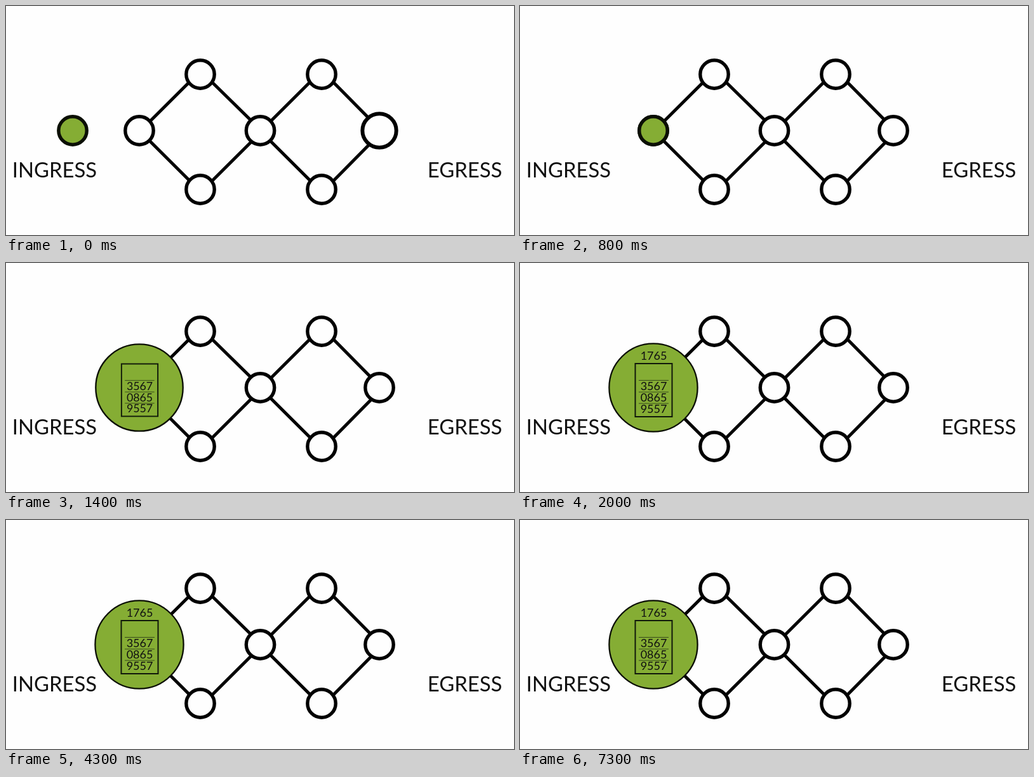
These frames come from a looping animation (800x362 px, 8000 ms). An HTML page:

```html
<!DOCTYPE html>
<html lang="en">
<head>
<meta charset="utf-8">
<title>Network ingress</title>
<style>
  html, body { margin: 0; width: 100%; height: 100%; overflow: hidden; background: #fefefe; }
  svg { display: block; width: 800px; height: 362px; }
  text { font-family: Lato, sans-serif; fill: #111; }
  .caption { font-size: 32.8px; }
  .digits { font-size: 18px; text-anchor: middle; }
  .edges { stroke: #000; stroke-width: 5; fill: none; }
  .node { fill: #fefefe; stroke: #000; stroke-width: 5.4; }
  #packet circle { fill: #85ad34; stroke: #0b0f04; }
  .stack rect { fill: none; stroke: #10180a; stroke-width: 2; }
  .stack path { stroke: #35481a; stroke-width: 1; }
</style>
</head>
<body>
<svg viewBox="0 0 800 362">
  <path class="edges" d="M224 185L291 118M224 211L291 278M322 118L390 185M322 279L390 211
    M414 185L481 118M414 211L481 278M513 118L576 182M513 279L576 215"/>
  <g id="nodes"></g>
  <text class="caption" x="9.8" y="270.7">INGRESS</text>
  <text class="caption" x="663.8" y="270.7">EGRESS</text>
  <g id="packet">
    <circle id="disc" r="22.2" stroke-width="5.4"/>
    <g id="content" class="stack">
      <rect x="-28.5" y="-38" width="58" height="84"/>
      <path d="M-23 -11.5H24M-23 7H24M-23 25H24"/>
      <text class="digits" x="0.5" y="4">3567</text>
      <text class="digits" x="0.5" y="22">0865</text>
      <text class="digits" x="0.5" y="39.5">9557</text>
      <text class="digits" id="label" x="0.5" y="-44">1765</text>
    </g>
  </g>
</svg>
<script>
  const LOOP = 8000;
  const $ = id => document.getElementById(id);

  const centers = [[210, 197], [306, 108], [306, 290], [400.5, 197], [497, 108], [497, 290], [588, 197]];
  for (const [cx, cy] of centers) {
    const node = document.createElementNS('http://www.w3.org/2000/svg', 'circle');
    node.setAttribute('class', 'node');
    node.setAttribute('cx', cx);
    node.setAttribute('cy', cy);
    node.setAttribute('r', 22.2);
    $('nodes').append(node);
  }

  // Each step: [time in ms, styles, easing towards the next step]
  function play(element, steps) {
    const frames = steps.map(([time, styles, easing = 'linear']) =>
      ({ offset: time / LOOP, easing, ...styles }));
    frames.push({ ...frames[frames.length - 1], offset: 1 });
    element.animate(frames, { duration: LOOP, iterations: Infinity });
  }

  const at = x => ({ transform: `translate(${x}px, 197px)` });
  const small = { r: '22.2px', strokeWidth: '5.4px' };
  const large = { r: '69.6px', strokeWidth: '2.3px' };
  const grow = 'cubic-bezier(.33, .33, .4, 1)';

  play($('packet'), [[0, at(105), 'ease-in-out'], [700, at(210)]]);
  play($('nodes').lastChild, [
    [0, { r: '26.7px', strokeWidth: '6px' }, 'ease-out'],
    [300, small]
  ]);
  play($('disc'), [[0, small], [900, small, grow], [1500, large]]);
  play($('content'), [
    [0, { transform: 'scale(.345)', opacity: 0 }],
    [900, { transform: 'scale(.345)', opacity: 0 }, grow],
    [1500, { transform: 'scale(1)', opacity: 1 }]
  ]);
  play($('label'), [[0, { opacity: 0 }], [1400, { opacity: 0 }], [1800, { opacity: 1 }]]);
</script>
</body>
</html>
```
